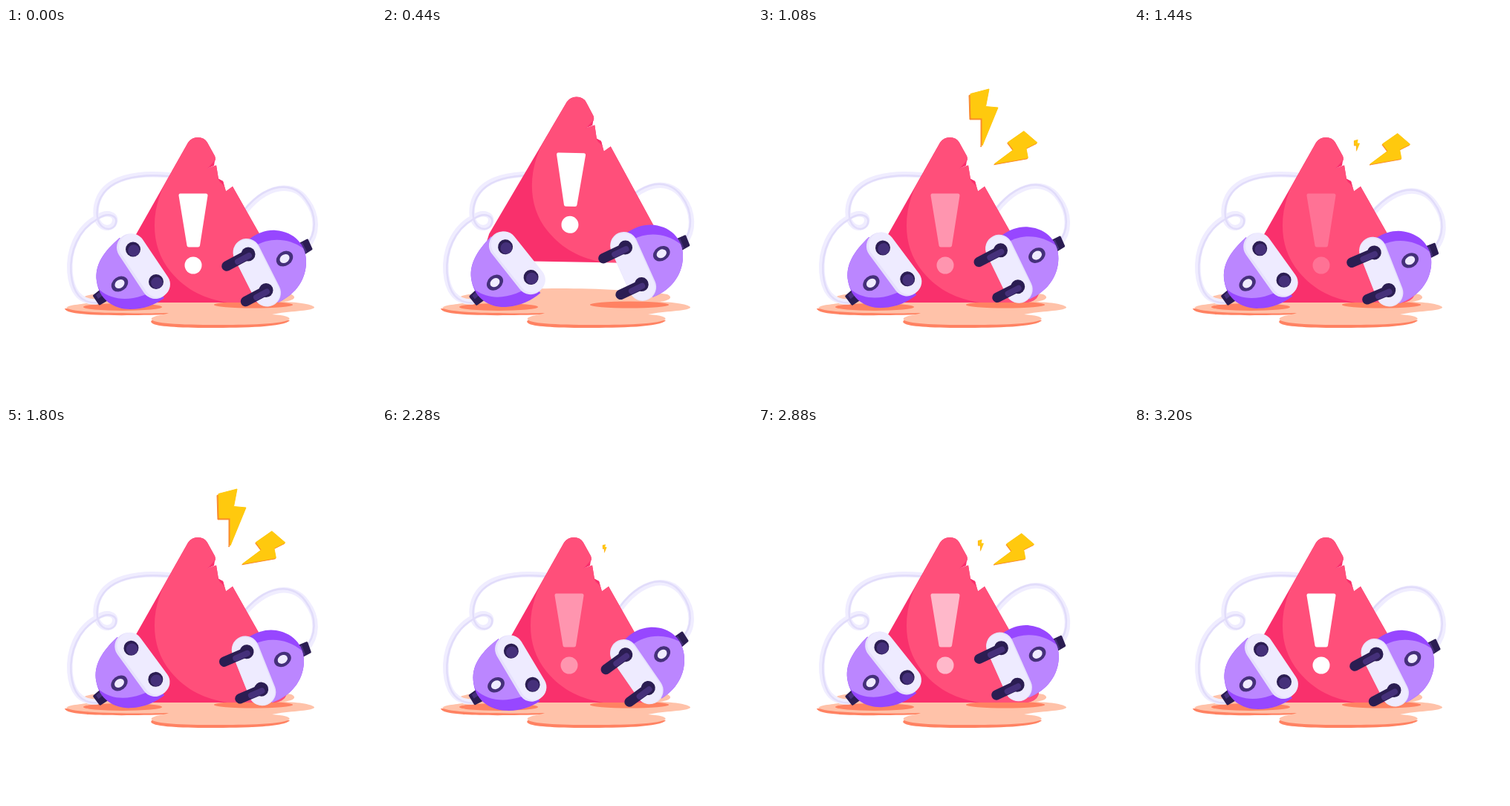
An HTML page for the animation above (3240 ms loop, 498 by 500 pixels).

```html
<!DOCTYPE html>
<html lang="en">
<head>
<meta charset="utf-8">
<title>Unplugged warning</title>
<style>
  html, body { margin: 0; width: 100%; height: 100%; overflow: hidden; background: #fff; }
  svg { display: block; width: 498px; height: 500px; }
  .dark { fill: #2b1d52; }
  .ink { fill: #45307a; }
  .lilac { fill: #bb86ff; }
  .violet { fill: #9747ff; }
  .cord { fill: none; stroke: #f0edff; stroke-width: 7.5; stroke-linecap: round; }
  .cord.shade { stroke: #e1dcfa; stroke-width: 2.5; }
  .cap { fill: none; stroke-linecap: round; stroke: #eeebff; stroke-width: 35; }
  .cap.back { stroke: #e6e0fc; stroke-width: 37; }
  .prong { stroke: #2b1d52; stroke-width: 13.5; stroke-linecap: round; }
  .prong.lit { stroke: #45307a; stroke-width: 8; }
  .tail { fill: #2b1d52; stroke: #2b1d52; stroke-width: 3; stroke-linejoin: round; }
  .spark { fill: #ffc90e; stroke: #ffc90e; stroke-linejoin: round; }
  .spark.edge { fill: #f98a2b; stroke: #f98a2b; }
</style>
</head>
<body>
<svg viewBox="0 0 498 500">
  <defs>
    <path id="sign" d="M245 154 Q250 147 258 147 Q267 147 271 154 L281 172
      Q283 177 280 180 L271 189 L283 184.500 L286 203 L292 206 L296 219.500 L305 213
      L373 333 Q388 367 360 369 L160 369 Q131 369 143.500 333 Z"/>
    <clipPath id="inSign"><use href="#sign"/></clipPath>
    <path id="bolt1" d="M286 88.500 L311 82 L306.500 105.500 L323 107 L302 158 L302 121 L287 121 Z"/>
    <path id="bolt2" d="M336.500 153.500 L358 138.500 L376 154 L361 161.500 L363.500 174.500 L318.500 182.500 L344 163.500 Z"/>
    <path id="cordL" d="M236 200 C178 191 130 200 122 238 C117 266 136 275 145 264
      C152 251 137 245 122 255 C95 270 84 300 86 328 C88 352 98 369 122 368"/>
  </defs>

  <g>
    <path fill="#ff8262" d="M79 377 C80 385 120 388 222 385 L219 387 C205 390 190 392 197 397
      C203 401 230 403 275 403 C320 403 375 402 382 393 L300 380 Z"/>
    <path fill="#ffc2a9" d="M81 376 C86 371 104 372 118 368 C98 365 100 359 126 357
      C160 353 190 350 238 350 C290 350 350 353 384 358 C392 362 388 366 374 368
      C402 369 416 373 415 376 C410 381 380 380 358 385 C376 386 384 389 381 392
      C370 399 310 399 275 399 C225 399 192 396 196 390 C200 386 212 386 219 383
      C180 384 92 384 81 376 Z"/>
    <ellipse cx="157" cy="375" rx="53" ry="5" fill="#ff8262"/>
    <ellipse cx="333" cy="372" rx="53" ry="4.500" fill="#ff8262"/>
  </g>

  <use href="#cordL" class="cord"/>
  <use href="#cordL" class="cord shade" x="1.500" y="1.500"/>
  <path class="cord bend"/>
  <path class="cord shade bend" transform="translate(-1.500 -1.500)"/>

  <g id="warning">
    <use href="#sign" fill="#f9306c"/>
    <path clip-path="url(#inSign)" fill="#ff4f7a" d="M223 193 C195 235 190 290 222 328
      C243 353 268 364 298 369 L410 369 L410 140 L223 140 Z"/>
    <path fill="#f9306c" d="M281 178 L271 189 L280 185 Z M285 202 L292 206 L293.500 212 L288 207 Z"/>
    <g id="mark" fill="#fff">
      <path stroke="#fff" stroke-width="5" stroke-linejoin="round" d="M235 225 L269 225 L258.500 292 L246 292 Z"/>
      <circle cx="252" cy="319" r="11.500"/>
    </g>
  </g>

  <g id="socket">
    <path class="tail" d="M118.500 360 L128 352.500 L138 364 L126 371 Z"/>
    <path class="ink" d="M121 359 L128 353 L132 358 L124 364 Z"/>
    <path class="violet" d="M153 282 C132 300 119 318 122 340 C125 365 145 378 167 378 C186 378 200 372 213 363 Z"/>
    <path class="lilac" d="M153 282 C132 300 119 318 122 340 C123 345 124 349 126 352 C148 371 180 365 205 350 Z"/>
    <path class="cap back" d="M167.500 295 L201 345.500"/>
    <path class="cap" d="M169.500 294 L203.500 344.500"/>
    <circle class="dark" cx="171" cy="297.500" r="10"/>
    <circle class="ink" cx="172" cy="299" r="7.800"/>
    <circle class="dark" cx="202" cy="341" r="10"/>
    <circle class="ink" cx="203" cy="342.500" r="7.800"/>
    <g transform="translate(153 344) rotate(-35)">
      <ellipse class="ink" rx="12" ry="9.500"/>
      <ellipse rx="7" ry="5.500" fill="#f0ecff"/>
    </g>
  </g>

  <g id="plug">
    <path class="tail" d="M394 291 L405.500 285 L411 297 L400 304 Z"/>
    <path class="ink" d="M394 291 L399 288.500 L405 301 L400 304 Z"/>
    <path class="violet" d="M326 285 C338 275 352 271 363 272 C389 274 404 292 404 314 C404 336 392 357 366 369 Z"/>
    <path class="lilac" d="M335 293 C355 281 380 282 400 296 C403 302 404 308 404 314 C404 336 392 357 366 369 Z"/>
    <path class="cap back" d="M324 301.500 L351.500 356"/>
    <path class="cap" d="M323.500 302 L351 356.500"/>
    <circle class="dark" cx="326" cy="304" r="9.500"/>
    <circle class="dark" cx="350" cy="352.500" r="9.500"/>
    <path class="prong" d="M325 305 L297 320 M349 353.500 L322.500 367.500"/>
    <path class="prong lit" d="M327 306 L312 314 M351 354.500 L337 362"/>
    <g transform="translate(375 310) rotate(-35)">
      <ellipse class="ink" rx="12" ry="9.500"/>
      <ellipse rx="7" ry="5.500" fill="#f0ecff"/>
    </g>
  </g>

  <g id="spark1">
    <use href="#bolt1" class="spark edge" x="-2" y="2"/>
    <use href="#bolt1" class="spark"/>
  </g>
  <g id="spark2">
    <use href="#bolt2" class="spark edge" x="-0.800" y="1.200"/>
    <use href="#bolt2" class="spark"/>
  </g>
</svg>
<script>
  const LOOP = 3240, STEP = 40, BEAT = 400, SPARK = 720;
  const byId = id => document.getElementById(id);
  const [warning, mark, socket, plug, spark1, spark2] =
    ['warning', 'mark', 'socket', 'plug', 'spark1', 'spark2'].map(byId);
  const bends = document.querySelectorAll('.bend');

  // One value per beat; the sway runs forward, then back.
  const sway = {
    socket: [0, -5, 5, -5, 0],
    turn: [0, 3, -11, 4, 6],
    x: [0, 0.7, 5, -1, -6],
    y: [0, -8, -2, -5.5, 3]
  };

  const ease = p => (1 - Math.cos(Math.PI * p)) / 2;

  function onBeat(values, t) {
    const last = values.length - 1;
    const pos = Math.min(Math.max(t / BEAT, 0), last);
    const i = Math.min(Math.floor(pos), last - 1);
    return values[i] + (values[i + 1] - values[i]) * ease(pos - i);
  }

  // Linear track made of [time, value] pairs.
  function track(keys, t) {
    if (t <= keys[0][0]) return keys[0][1];
    for (let i = 1; i < keys.length; i++) {
      const [t0, a] = keys[i - 1], [t1, b] = keys[i];
      if (t <= t1) return a + (b - a) * (t - t0) / (t1 - t0);
    }
    return keys[keys.length - 1][1];
  }

  const set = (el, value) => el.setAttribute('transform', value);

  function scaleAt(el, s, from, to) {
    el.style.display = s > 0.01 ? '' : 'none';
    set(el, `translate(${to}) scale(${s}) translate(${-from[0]} ${-from[1]})`);
  }

  function drawPlugs(t) {
    const m = t < 1600 ? t : Math.max(3200 - t, 0);
    set(socket, `rotate(${onBeat(sway.socket, m)} 130 355)`);
    const turn = onBeat(sway.turn, m), x = onBeat(sway.x, m), y = onBeat(sway.y, m);
    set(plug, `translate(${x} ${y}) rotate(${turn} 350 320)`);

    // The cord ends at the swaying tail of the plug.
    const a = turn * Math.PI / 180, c = Math.cos(a), s = Math.sin(a);
    const tx = 350 + x + 55 * c + 26 * s, ty = 320 + y + 55 * s - 26 * c;
    const d = (ty - 294) * 0.75;
    const path = `M310 ${264 + d / 2} C340 ${212 + d} 385 ${202 + d} 405 ${232 + d}` +
      ` C420 ${252 + d} 420 ${278 + d} ${tx} ${ty}`;
    bends.forEach(b => b.setAttribute('d', path));
  }

  function drawSparks(t) {
    const on = t >= 800 && t < 800 + 3 * SPARK;
    const u = on ? (t - 800) % SPARK : 0;
    const s1 = track([[0, 0], [280, 1], [480, 1], [680, 0]], u);
    const y1 = track([[0, 169], [280, 120], [440, 112], [480, 112], [680, 169]], u);
    const s2 = track([[120, 0], [420, 1.87], [560, 1.87], [720, 0]], u);
    scaleAt(spark1, s1, [303, 120], [299 + 4 * s1, y1]);
    scaleAt(spark2, s2, [308, 189], [308, 189]);
  }

  function draw(t) {
    const lift = onBeat([0, 1, 0], t);
    set(warning, `translate(${lift} ${-56 * lift}) rotate(${lift} 252 319)`);
    const blinking = t >= 800 && t < 3200;
    mark.setAttribute('opacity', blinking ? Math.abs(1 - (t - 800) % BEAT / 200) : 1);
    drawPlugs(t);
    drawSparks(t);
  }

  const start = performance.now();
  function tick() {
    const t = (performance.now() - start) % LOOP;
    draw(Math.floor(t / STEP) * STEP);
    requestAnimationFrame(tick);
  }
  tick();
</script>
</body>
</html>
```
